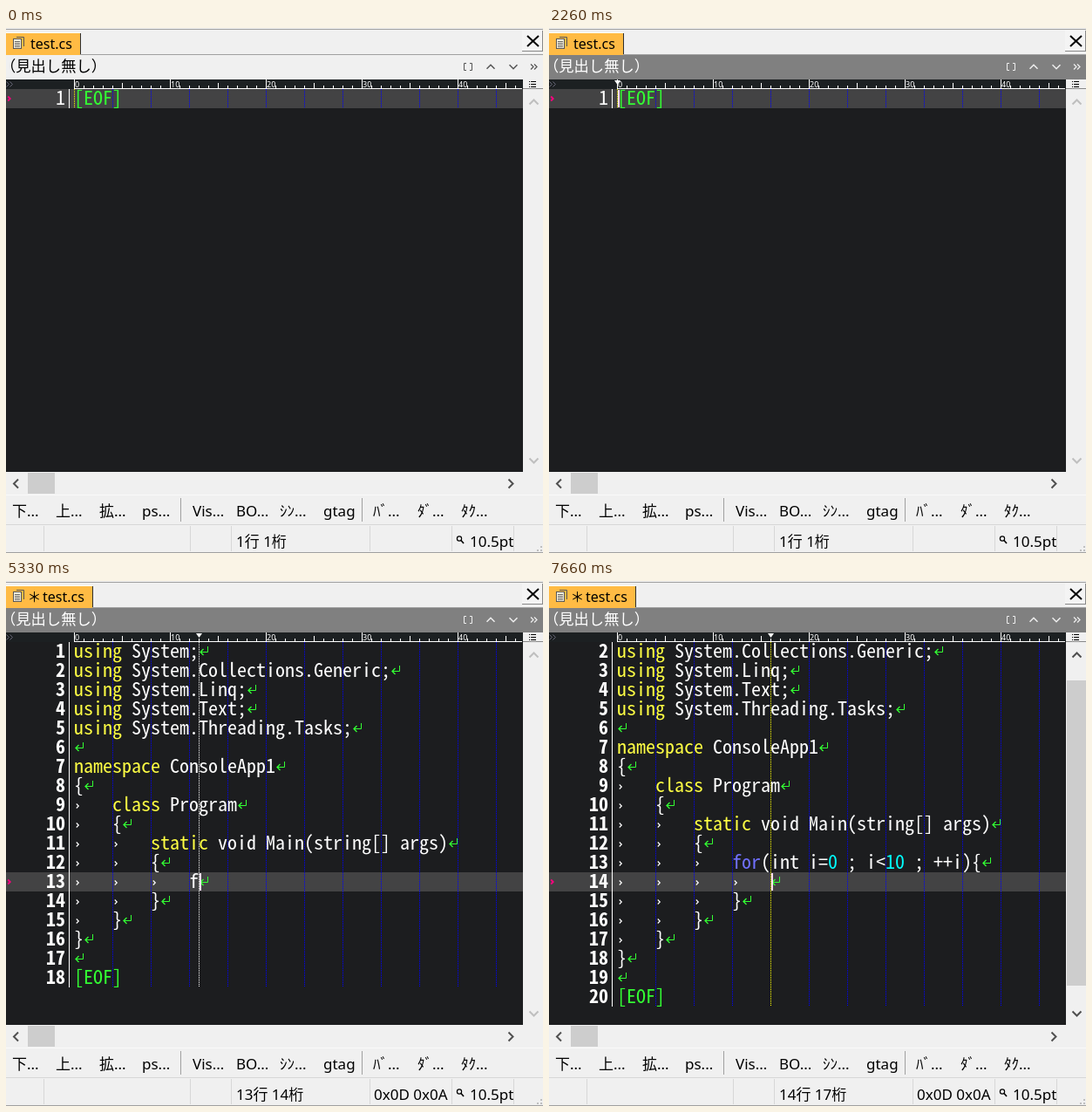
Recreate the animation shown at these times as an HTML page with a canvas. Size 616 px wide and 602 px high, loop 8000 ms.

```html
<!DOCTYPE html>
<html lang="ja">
<head>
<meta charset="utf-8">
<style>
html, body { margin: 0; width: 100%; height: 100%; overflow: hidden; background: #f0f0f0; }
canvas { display: block; }
</style>
</head>
<body>
<canvas id="stage" width="616" height="602"></canvas>
<script>
const c = document.getElementById('stage').getContext('2d');
const LOOP = 8000, LEFT = 78, TOP = 70, CELL = 11, ROW = 22;
const UI = '"Noto Sans", "Noto Sans CJK JP", sans-serif';
const MONO = '"Noto Sans Mono CJK JP", "Noto Sans Mono", monospace';
const EDITOR = '#1c1d1f', FACE = '#f0f0f0', GREEN = '#33ff33';

// Font size at which one character is exactly one cell wide
c.font = '100px ' + MONO;
const monoSize = CELL * 100 / c.measureText('0').width;

const HEAD = `using System;
using System.Collections.Generic;
using System.Linq;
using System.Text;
using System.Threading.Tasks;

namespace ConsoleApp1
{
\tclass Program
\t{
\t\tstatic void Main(string[] args)
\t\t{
`;
const TAIL = '\n\t\t}\n\t}\n}\n\n';
const LOOP_CODE = '\t\t\tfor(int i=0 ; i<10 ; ++i){\n\t\t\t\t\n\t\t\t}';

const FIRST = [[0, ''], [2330, 'ma'], [2420, 'main']];
const TYPED = [[3750, ''], [5330, 'f'], [5480, 'for '], [5860, 'for i'],
  [6170, 'for i '], [6240, 'for i 1'], [6410, 'for i 10']];
const LABELS = [[7, '下...'], [57, '上...'], [107, '拡...'], [156, 'ps...'], [214, 'Vis...'],
  [264, 'BO...'], [314, 'ｼﾝ...'], [364, 'gtag'], [421, 'ﾊﾞ...'], [472, 'ﾀﾞ...'], [522, 'ﾀｸ...']];

const within = (t, a, b) => t >= a && t < b;
const pick = (steps, t) => steps.filter(s => s[0] <= t).pop()[1];

function rect(x, y, w, h, color) {
  c.fillStyle = color;
  c.fillRect(x, y, w, h);
}
function text(s, x, y, size, color, font = UI, weight = '') {
  c.font = `${weight} ${size}px ${font}`;
  c.fillStyle = color;
  c.fillText(s, x, y);
}
function line(points, color, width = 1) {
  c.beginPath();
  points.forEach(([x, y]) => c.lineTo(x, y));
  c.strokeStyle = color;
  c.lineWidth = width;
  c.stroke();
}
// Chevron centred on x, y, pointing along dx, dy
function chevron(x, y, dx, dy, r, color, width = 2) {
  const h = r / 2;
  line([[x - dx * h - dy * r, y - dy * h - dx * r], [x + dx * h, y + dy * h],
    [x - dx * h + dy * r, y - dy * h + dx * r]], color, width);
}
function dotted(x, y0, y1, color) {
  for (let y = y0; y < y1; y += 2) rect(x, y, 1, 1, color);
}

function documentAt(t) {
  if (t < 3750) {
    const s = pick(FIRST, t);
    return { lines: [s], row: 0, col: s.length, first: 0 };
  }
  if (t < 7350) {
    const s = pick(TYPED, t);
    return { lines: (HEAD + '\t\t\t' + s + TAIL).split('\n'), row: 12, col: 12 + s.length, first: 0 };
  }
  return { lines: (HEAD + LOOP_CODE + TAIL).split('\n'), row: 13, col: 16, first: 1 };
}

function drawTabs(modified) {
  const w = modified ? 99 : 85, x = modified ? 42 : 28;
  rect(0, 0, 616, 31, FACE);
  rect(0, 1, 616, 1, '#a0a0a0');
  rect(0, 30, 616, 1, '#a0a0a0');
  rect(0, 5, w, 26, '#ffbb44');
  rect(0, 5, w, 1, '#fff');
  rect(w, 6, 1, 24, '#303030');
  rect(9, 12, 9, 12, '#f5efdc');
  c.strokeStyle = '#555';
  c.lineWidth = 1;
  c.strokeRect(8.5, 12.5, 9, 11);
  line([[12, 10.5], [20.5, 10.5], [20.5, 21]], '#555');
  for (let y = 15; y < 23; y += 2) rect(10, y, 6, 1, '#666');
  if (modified) text('＊', 24.5, 24, 16, '#000');
  text('test.cs', x, 24, 16, '#000');
  rect(592, 3, 24, 24, '#f4f4f4');
  rect(592, 26, 24, 1, '#888');
  rect(615, 3, 1, 24, '#888');
  line([[598, 9], [611, 21]], '#000', 2);
  line([[611, 9], [598, 21]], '#000', 2);
}

function drawHeading(focused, shown) {
  const ink = focused ? '#fff' : '#000', mark = focused ? '#eee' : '#555';
  rect(0, 31, 616, 28, focused ? '#808080' : FACE);
  if (shown) text('（見出し無し）', -6, 50, 17.3, ink);
  line([[528, 40.5], [525.5, 40.5], [525.5, 48.5], [528, 48.5]], mark);
  line([[532, 40.5], [534.5, 40.5], [534.5, 48.5], [532, 48.5]], mark);
  chevron(556, 44.5, 0, -1, 4.5, mark, 1.5);
  chevron(582, 44.5, 0, 1, 4.5, mark, 1.5);
  chevron(603.5, 44.5, 1, 0, 3, mark, 1.2);
  chevron(607.5, 44.5, 1, 0, 3, mark, 1.2);
}

function drawRuler(col, focused) {
  rect(0, 59, 593, 11, '#1c2022');
  chevron(2, 64.5, 1, 0, 3, '#667', 1);
  chevron(6, 64.5, 1, 0, 3, '#667', 1);
  rect(LEFT, 69, 514, 1, '#fff');
  for (let i = 0; i < 47; i++) {
    const x = LEFT + i * CELL, h = i % 10 === 0 ? 10 : i % 5 === 0 ? 6 : 3;
    rect(x, 69 - h, 1, h, '#fff');
    if (i % 10 === 0) text(i, x + 1, 68, 9, '#fff');
  }
  if (focused) {
    const x = LEFT + col * CELL;
    c.fillStyle = '#fff';
    c.beginPath();
    c.moveTo(x - 3, 60);
    c.lineTo(x + 4, 60);
    c.lineTo(x + 0.5, 65);
    c.fill();
  }
  rect(593, 59, 23, 11, FACE);
  rect(593, 69, 23, 1, '#888');
  for (let y = 61; y < 68; y += 3) {
    rect(600, y, 1, 1, '#000');
    rect(602, y, 6, 1, '#000');
  }
}

function drawReturn(x, y) {
  line([[x + 10.5, y + 5], [x + 10.5, y + 11.5], [x + 2, y + 11.5]], GREEN);
  line([[x + 5.5, y + 8], [x + 2, y + 11.5], [x + 5.5, y + 15]], GREEN, 1.3);
}

function drawLine(s, y, last) {
  const base = y + 18;
  let x = LEFT;
  for (const part of s.match(/\t|\w+|[^\w\t]+/g) || []) {
    if (part === '\t') {
      chevron(x + 4, y + 12, 1, 0, 2.5, '#fff', 1.2);
      x += 4 * CELL;
      continue;
    }
    const color = /^(using|namespace|class|static)$/.test(part) ? '#ffff44'
      : part === 'for' ? '#7070ff' : /^\d+$/.test(part) ? '#00ffff' : '#fff';
    text(part, x, base, monoSize, color, MONO);
    x += part.length * CELL;
  }
  if (last) text('[EOF]', x, base, monoSize, GREEN, MONO);
  else drawReturn(x, y);
}

function drawEditor(doc, modified, caretShown) {
  const { lines, row, col, first } = doc;
  const bottom = TOP + (lines.length - first) * ROW;
  const caretX = LEFT + col * CELL, caretY = TOP + (row - first) * ROW;
  rect(0, TOP, 593, 439, EDITOR);
  rect(0, caretY, 593, ROW, '#434344');
  chevron(3.5, caretY + 11, 1, 0, 2.5, '#ff0080', 1.8);
  for (let x = LEFT + 44; x < 593; x += 44) dotted(x, TOP, bottom, '#0000ff');
  rect(72, TOP, 1, bottom - TOP, '#fff');
  for (let i = first; i < lines.length; i++) {
    const y = TOP + (i - first) * ROW, n = String(i + 1);
    text(n, 68 - n.length * CELL, y + 18, monoSize, '#fff', MONO, modified ? 'bold' : '');
    drawLine(lines[i], y, i === lines.length - 1);
  }
  dotted(caretX, TOP, bottom, col % 4 ? '#fff' : '#ffff00');
  if (caretShown) rect(caretX + 1, caretY + 1, 2, 20, '#ffddff');
}

function drawScrollbars(scrolled) {
  const ink = scrolled ? '#505050' : '#bfbfbf';
  rect(593, 70, 23, 465, FACE);
  rect(0, 509, 616, 26, FACE);
  if (scrolled) rect(594, 114, 22, 350, '#cdcdcd');
  chevron(605.5, 85, 0, -1, 5, ink);
  chevron(605.5, 496, 0, 1, 5, ink);
  rect(25, 510, 31, 24, '#cdcdcd');
  chevron(11.5, 522.5, -1, 0, 5, '#505050');
  chevron(579, 522.5, 1, 0, 5, '#505050');
}

function drawBars(doc, labelled) {
  rect(0, 535, 616, 67, FACE);
  rect(0, 535, 616, 1, '#fafafa');
  if (labelled) LABELS.forEach(([x, s]) => text(s, x, 560, 17, '#000'));
  for (const x of [200, 408]) rect(x, 539, 1, 27, '#a0a0a0');
  rect(0, 569, 616, 1, '#d7d7d7');
  for (const x of [43, 211, 258, 417, 511, 582]) rect(x, 571, 1, 29, '#d7d7d7');
  text(`${doc.row + 1}行 ${doc.col + 1}桁`, 264, 595, 17, '#000');
  if (doc.lines.length > 1) text('0x0D 0x0A', 422, 595, 17, '#000');
  c.strokeStyle = '#000';
  c.lineWidth = 1.2;
  c.beginPath();
  c.arc(520, 585.5, 2.6, 0, 7);
  c.stroke();
  line([[522, 587.5], [525, 591]], '#000', 1.6);
  text('10.5pt', 532, 595, 17, '#000');
  rect(0, 601, 616, 1, '#a0a0a0');
  for (let x = 609; x < 616; x += 4) rect(x, 598, 2, 2, '#bfbfbf');
  rect(613, 594, 2, 2, '#bfbfbf');
}

function drawPointer(t) {
  if (!within(t, 150, 2260)) return;
  let x = 341, y = 295;
  if (t < 700) {
    const left = 1 - Math.min(1, Math.floor((t - 70) / 80) / 6);
    x = 352 + 60 * left * left;
    y = 294 + 250 * left * left;
  } else if (t < 780) x = 346;
  if (y > 495) return;
  rect(x, y - 11, 2, 22, '#fff');
  for (const side of [-12, 11]) {
    rect(x - 7, y + side, 6, 2, '#fff');
    rect(x + 2, y + side, 6, 2, '#fff');
  }
}

function draw(t) {
  const doc = documentAt(t), focused = t >= 70, modified = t >= 2330;
  const caretShown = focused && !within(t, 3670, 3750) && !within(t, 7180, 7350);
  drawTabs(modified);
  drawHeading(focused, !within(t, 3750, 3900) && !within(t, 7500, 7660));
  drawRuler(doc.col, focused);
  drawEditor(doc, modified, caretShown);
  drawScrollbars(doc.first > 0);
  drawBars(doc, !within(t, 3200, 3430) && !within(t, 6940, 7110));
  drawPointer(t);
}

function tick() {
  draw(performance.now() % LOOP);
  requestAnimationFrame(tick);
}
tick();
</script>
</body>
</html>
```
